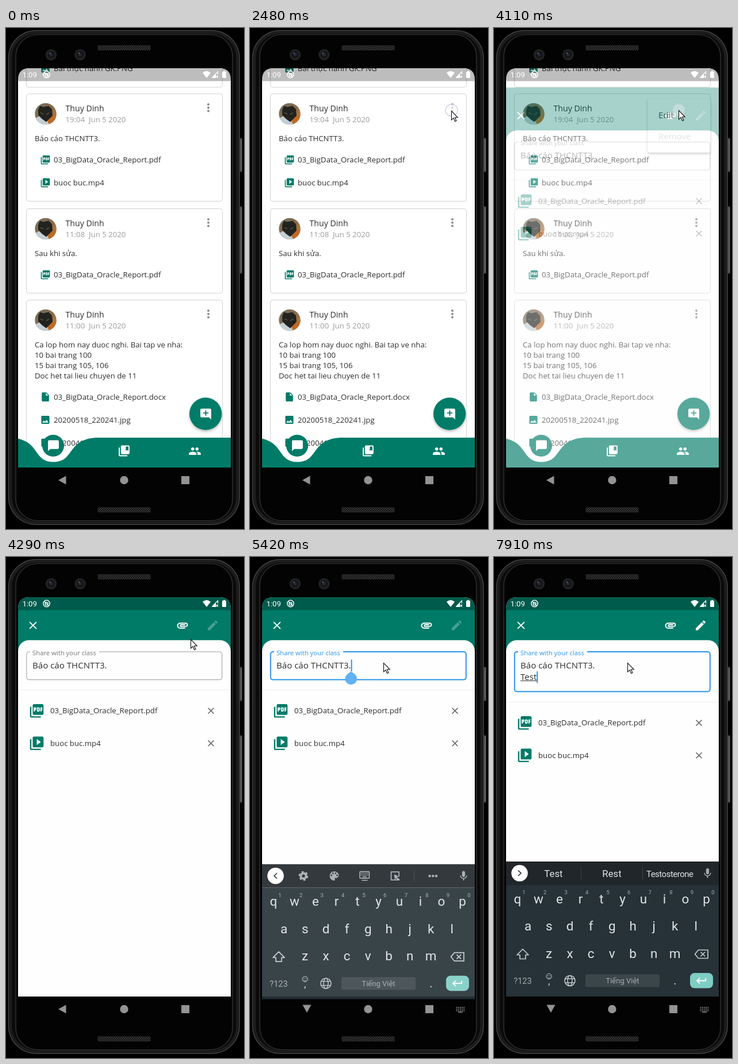
An HTML page that plays this animation: 414x872 px, repeating every 8 s.

```html
<!DOCTYPE html>
<html lang="vi">
<head>
<meta charset="utf-8">
<title>Class feed</title>
<style>
html,body{margin:0;width:100%;height:100%;overflow:hidden;background:#000}
svg{display:block;width:100vw;height:100vh}
text{font-family:"Open Sans","Noto Sans",sans-serif;white-space:pre}
.kb text,.sys text{font-family:Roboto,"Noto Sans",sans-serif}
</style>
</head>
<body>
<svg id="stage" viewBox="0 0 414 872" xmlns="http://www.w3.org/2000/svg"></svg>
<script>
const GREEN = '#007b68', BLUE = '#2b95ea', KEY = '#dfe3e5', DIM = '#a3abaf', INK = '#2d2d2d', LOOP = 8000;
const SMALL = 13.19, BIG = 15.07;

const ICONS = {
  pdf: 'M20 2H8c-1.1 0-2 .9-2 2v12c0 1.1.9 2 2 2h12c1.1 0 2-.9 2-2V4c0-1.1-.9-2-2-2zm-8.5 7.5c0 .83-.67 1.5-1.5 1.5H9v2H7.5V7H10c.83 0 1.5.67 1.5 1.5v1zm5 2c0 .83-.67 1.5-1.5 1.5h-2.5V7H15c.83 0 1.5.67 1.5 1.5v3zm4-3H19v1h1.5V11H19v2h-1.5V7h3v1.5zM9 9.5h1v-1H9v1zM4 6H2v14c0 1.1.9 2 2 2h14v-2H4V6zm10 5.5h1v-3h-1v3z',
  video: 'M4 6H2v14c0 1.1.9 2 2 2h14v-2H4V6zm16-4H8c-1.1 0-2 .9-2 2v12c0 1.1.9 2 2 2h12c1.1 0 2-.9 2-2V4c0-1.1-.9-2-2-2zm-8 12.5v-9l6 4.5-6 4.5z',
  file: 'M6 2c-1.1 0-2 .9-2 2v16c0 1.1.9 2 2 2h12c1.1 0 2-.9 2-2V8l-6-6H6zm7 7V3.5L18.5 9H13z',
  image: 'M21 19V5c0-1.1-.9-2-2-2H5c-1.1 0-2 .9-2 2v14c0 1.1.9 2 2 2h14c1.1 0 2-.9 2-2zM8.5 13.5l2.5 3 3.5-4.5 4.5 6H5l3.5-4.5z',
  chat: 'M20 2H4c-1.1 0-2 .9-2 2v18l4-4h14c1.1 0 2-.9 2-2V4c0-1.1-.9-2-2-2z',
  add: 'M22 4c0-1.1-.9-2-2-2H4c-1.1 0-2 .9-2 2v12c0 1.1.9 2 2 2h14l4 4V4zm-5 7h-4v4h-2v-4H7V9h4V5h2v4h4v2z',
  book: 'M4 6H2v14c0 1.1.9 2 2 2h14v-2H4V6zm16-4H8c-1.1 0-2 .9-2 2v12c0 1.1.9 2 2 2h12c1.1 0 2-.9 2-2V4c0-1.1-.9-2-2-2zm0 10l-2.5-1.5L15 12V4h5v8z',
  people: 'M16 11c1.66 0 3-1.34 3-3s-1.34-3-3-3-3 1.34-3 3 1.34 3 3 3zm-8 0c1.66 0 3-1.34 3-3S9.66 5 8 5 5 6.34 5 8s1.34 3 3 3zm0 2c-2.33 0-7 1.17-7 3.5V19h14v-2.5c0-2.33-4.67-3.5-7-3.5zm8 0c-.29 0-.62.02-.97.05 1.16.84 1.97 1.97 1.97 3.45V19h6v-2.5c0-2.33-4.67-3.5-7-3.5z',
  close: 'M19 6.41L17.59 5 12 10.59 6.41 5 5 6.41 10.59 12 5 17.59 6.41 19 12 13.41 17.59 19 19 17.59 13.41 12z',
  clip: 'M2 12.5C2 9.46 4.46 7 7.5 7H18c2.21 0 4 1.79 4 4s-1.79 4-4 4H9.5C8.12 15 7 13.88 7 12.5S8.12 10 9.5 10H17v2H9.41c-.55 0-.55 1 0 1H18c1.1 0 2-.9 2-2s-.9-2-2-2H7.5C5.57 9 4 10.57 4 12.5S5.57 16 7.5 16H17v2H7.5C4.46 18 2 15.54 2 12.5z',
  edit: 'M3 17.25V21h3.75L17.81 9.94l-3.75-3.75L3 17.25zM20.71 7.04c.39-.39.39-1.02 0-1.41l-2.34-2.34c-.39-.39-1.02-.39-1.41 0l-1.83 1.83 3.75 3.75 1.83-1.83z',
  palette: 'M12 3c-4.97 0-9 4.03-9 9s4.03 9 9 9c.83 0 1.5-.67 1.5-1.5 0-.39-.15-.74-.39-1.01-.23-.26-.38-.61-.38-.99 0-.83.67-1.5 1.5-1.5H16c2.76 0 5-2.24 5-5 0-4.42-4.03-8-9-8z',
  mic: 'M12 14c1.66 0 3-1.34 3-3V5c0-1.66-1.34-3-3-3S9 3.34 9 5v6c0 1.66 1.34 3 3 3zm5.3-3c0 3-2.54 5.1-5.3 5.1S6.7 14 6.7 11H5c0 3.41 2.72 6.23 6 6.72V21h2v-3.28c3.28-.48 6-3.3 6-6.72h-1.7z',
  enter: 'M19 7v4H5.83l3.58-3.59L8 6l-6 6 6 6 1.41-1.41L5.83 13H21V7z'
};

// Markup helpers
const icon = (name, cx, cy, size, fill, extra = '') =>
  `<path d="${ICONS[name]}" fill="${fill}" transform="translate(${cx - size / 2} ${cy - size / 2}) scale(${size / 24})" ${extra}/>`;
const text = (x, y, s, size, fill = INK, extra = '') =>
  `<text x="${x}" y="${y}" font-size="${size}" fill="${fill}" ${extra}>${s}</text>`;
const mid = (x, y, s, size, fill, extra = '') => text(x, y, s, size, fill, `text-anchor="middle" ${extra}`);
const rect = (x, y, w, h, fill, extra = '') =>
  `<rect x="${x}" y="${y}" width="${w}" height="${h}" fill="${fill}" ${extra}/>`;
const dot = (x, y, r, fill, extra = '') => `<circle cx="${x}" cy="${y}" r="${r}" fill="${fill}" ${extra}/>`;
const line = (d, color, w = 1, extra = '') =>
  `<path d="${d}" fill="none" stroke="${color}" stroke-width="${w}" ${extra}/>`;
const group = (id, body, extra = '') => `<g id="${id}" ${extra}>${body}</g>`;

const avatar = y => `<g transform="translate(50 ${y - 19})" clip-path="url(#round)">
  <rect width="38" height="38" fill="url(#photo)"/>
  <path d="M0 27L10 22 22 31 25 38H0Z" fill="#c3cfd3"/>
  <path d="M23 26L38 19V38H25Z" fill="#c06a25"/>
  <path d="M6 12L9 5 15 7 24 5 30 11 31 22 25 28 20 33 13 28 6 21Z" fill="#22231f"/>
  <path d="M10 17l5 2M20 20l5-3" stroke="#62655a" stroke-width="1.2"/></g>`;

const fileRow = (y, [kind, name]) =>
  icon(kind, 68.5, y, 18.84, GREEN) + text(83, y + 4.7, name, SMALL);

function card(y, h, time, lines, files) {
  const first = y + 115 + (lines.length - 1) * 17.9;
  return rect(35.5, y, 341, h, '#fff', 'rx="4" stroke="#d2d2d2"') + avatar(y + 35)
    + text(103.5, y + 30.7, 'Thuy Dinh', 14.13)
    + text(103.5, y + 49.8, `${time}\u00a0 Jun 5 2020`, SMALL, '#9b9b9b')
    + [0, 1, 2].map(i => dot(352, y + 18.5 + i * 5.7, 2, '#8b8b8b')).join('')
    + lines.map((s, i) => text(50, y + 82.6 + i * 17.9, s, SMALL)).join('')
    + files.map((f, i) => fileRow(first + i * 39.8, f)).join('');
}

const REPORT = '03_BigData_Oracle_Report';

const feed = rect(21, 70, 370, 695, '#fefefe')
  + rect(35.5, 40, 341, 63, '#fff', 'rx="4" stroke="#d2d2d2"')
  + fileRow(70.5, ['image', 'Bài thực hành GK.PNG'])
  + card(114.5, 187, '19:04', ['Báo cáo THCNTT3.'], [['pdf', REPORT + '.pdf'], ['video', 'buoc buc.mp4']])
  + card(314.5, 147, '11:08', ['Sau khi sửa.'], [['pdf', REPORT + '.pdf']])
  + card(473.5, 330, '11:00',
      ['Ca lop hom nay duoc nghi. Bai tap ve nha:', '10 bai trang 100', '15 bai trang 105, 106', 'Doc het tai lieu chuyen de 11'],
      [['file', REPORT + '.docx'], ['image', '20200518_220241.jpg'], ['image', '20200418_214530.jpg']])
  + `<path d="M8.7 713C60.5 716.5 45.7 755.3 82.7 755.3S104.9 716.5 156.7 713H391V765H8.7Z" fill="${GREEN}"/>`
  + dot(82, 727, 19, GREEN) + icon('chat', 82.5, 727, 22.6, '#fff')
  + icon('book', 205.5, 736, 22.6, '#fff') + icon('people', 328.5, 736.5, 22.6, '#fff')
  + dot(347.2, 671.5, 28.2, GREEN, 'filter="url(#lift)"') + icon('add', 347.5, 672, 22.6, '#fff');

const menu = rect(0, 123.5, 109, 93, '#fff', 'id="menuBox" rx="3" filter="url(#lift)"')
  + text(286, 157, 'Edit', BIG, '#222', 'id="item0"') + text(286, 194, 'Remove', BIG, '#222', 'id="item1"');

const attached = (y, kind, name) => icon(kind, 53.5, y, 28.3, GREEN)
  + text(77, y + 4.7, name, SMALL) + icon('close', 356.5, y, 18.84, '#666');

const editor = rect(21, 70, 370, 695, GREEN)
  + rect(21, 144.8, 370, 640, '#fefefe', 'rx="18.8"')
  + icon('close', 47, 119, 22.6, '#fff') + icon('clip', 307, 119, 22.6, '#fff')
  + icon('edit', 359.5, 119, 22.6, '#fff', 'id="pencil"')
  + rect(35.8, 165, 340, 49, 'none', 'id="field" rx="4"') + rect(42, 160, 120, 10, '#fefefe')
  + text(46, 170.8, 'Share with your class', 11.3, BLUE, 'id="label"')
  + text(46, 193.8, 'Báo cáo THCNTT3.', BIG, INK, 'id="first"')
  + text(46, 214.2, '', BIG, INK, 'id="typed"') + rect(46, 215, 0, 1, '#333', 'id="under"')
  + rect(0, 178.5, 2, 20.5, BLUE, 'id="caret"')
  + `<path id="handle" d="M175.8 199L183.2 204.8A10.3 10.3 0 1 1 168.4 204.8Z" fill="#62b1f4"/>`
  + group('files', line('M21 231.5H391', '#ececec') + attached(267.7, 'pdf', REPORT + '.pdf') + attached(324.3, 'video', 'buoc buc.mp4'));

// Keyboard
const ROWS = [['qwertyuiop', 41, 602.5], ['asdfghjkl', 59.2, 650], ['zxcvbnm', 95.6, 697.5]];
const letters = ROWS.map(([keys, x, y]) =>
  [...keys].map((k, i) => mid(x + i * 36.5, y, k, 22.5, KEY, 'class="key"')).join('')).join('');
const digits = [...'1234567890'].map((d, i) => mid(52 + i * 36.55, 587, d, 9.5, DIM)).join('');

const keyGrid = (cx, cy, color) => [0, 1].map(r => [0, 1, 2, 3, 4].map(c =>
  rect(cx - 6.5 + c * 2.8, cy - 3.3 + r * 3, 1.7, 1.7, color)).join('')).join('')
  + rect(cx - 3.5, cy + 2.8, 7, 1.6, color);

const gear = dot(93, 550.5, 4.6, 'none', `stroke="${DIM}" stroke-width="4"`)
  + dot(93, 550.5, 7.2, 'none', `stroke="${DIM}" stroke-width="2.6" stroke-dasharray="3.77"`);

const tools = gear + icon('palette', 146.5, 550.5, 21, DIM)
  + [[-5, -1], [-2.3, -4.6], [2.3, -4.6], [5, -1]].map(([x, y]) => dot(146.5 + x, 550.5 + y, 1.4, '#20262a')).join('')
  + rect(191, 543, 16.5, 11.5, 'none', `rx="1" stroke="${DIM}" stroke-width="1.6"`) + keyGrid(199.3, 548.3, DIM)
  + line('M194.5 558H204.5', DIM, 1.6)
  + line('M259 552V543.5H245.5V557.5H259V555', DIM, 1.8) + `<path d="M250.5 547.5L258.5 551 255.8 552.6 259.5 556.5 257.5 558.5 253.8 554.6 252 557Z" fill="${DIM}"/>`
  + line('M285.5 541V560', '#3b4347') + [312.5, 318.3, 324].map(x => dot(x, 550.5, 2.2, DIM)).join('');

const hints = line('M151.5 539V562M258.5 539V562', '#3b4347')
  + [103.5, 205, 305.7].map((x, i) => mid(x, 557, '', 16.8, KEY, `id="hint${i}"`)).join('');

const keyboard = rect(21, 530, 370, 41, '#20262a') + rect(21, 571, 370, 194, '#263238')
  + dot(44.5, 550.3, 14.3, '#fff') + line('M47 545.5L42 550.3 47 555', '#333', 1.7, 'id="chevron"')
  + group('tools', tools) + group('hints', hints) + icon('mic', 371.5, 550.5, 21, DIM)
  + letters + digits
  + line('M50 682.5L40 692.5H45V699.5H55V692.5H60Z', '#c4cacd', 1.7, 'id="shift" stroke-linejoin="round"')
  + line('M355.5 684H372V698.5H355.5L349.5 691.2ZM359.5 687.5L367 695M367 687.5L359.5 695', '#c4cacd', 1.7)
  + mid(50, 743, '?123', 14.5, DIM)
  + dot(95.7, 730, 4.7, 'none', 'stroke="#c4cacd"') + line('M93 731.5Q95.7 735 98.4 731.5', '#c4cacd')
  + dot(94, 728.7, .8, '#c4cacd') + dot(97.4, 728.7, .8, '#c4cacd') + mid(95.7, 744, ',', 18, '#c4cacd')
  + dot(132, 737.5, 9, 'none', 'stroke="#c4cacd" stroke-width="1.5"')
  + '<ellipse cx="132" cy="737.5" rx="4" ry="9" fill="none" stroke="#c4cacd" stroke-width="1.4"/>'
  + line('M124 734H140M124 741H140', '#c4cacd', 1.4)
  + rect(159, 726.5, 129, 22, '#3b464b', 'rx="2.5"') + mid(223.5, 742.3, 'Tiếng Việt', 13, DIM)
  + mid(315, 744, '.', 20, KEY)
  + rect(341, 724, 40, 26.5, '#7fcdc4', 'rx="8"') + icon('enter', 361, 737.5, 22, '#fff');

// Phone shell
const speaker = y => rect(159.5, y, 92, 9, '#161616', 'rx="2"') + rect(159.5, y, 92, 9, 'url(#mesh)', 'rx="2"');
const lens = x => dot(x, 46.5, 9.8, '#202123') + dot(x, 46.5, 6, '#121315') + dot(x, 46.5, 3, '#242733') + dot(x - 2, 44, 1.4, '#55585f');
const button = (y, h) => rect(406, y, 5, h, '#303030', 'rx="2"') + line(`M408.8 ${y + 2}V${y + h - 2}`, '#7a7a7a', 1.6);
const shell = rect(0, 0, 414, 872, '#000') + button(191, 60) + button(310, 118)
  + rect(4.5, 4.5, 401.5, 859.5, '#0b0b0b', 'rx="48" stroke="#484848" stroke-width="1.5"')
  + rect(8, 8, 394.5, 852.5, 'none', 'rx="44" stroke="#1d1d1d" stroke-width="4"')
  + rect(17, 11.5, 377, 846, '#030303', 'rx="38" stroke="#383838" stroke-width="1.2"')
  + speaker(30) + speaker(834.3) + lens(78.5) + lens(129);

const status = rect(21, 70, 370, 22.5, '#000', 'fill-opacity=".26"')
  + text(28.5, 86, '1:09', 13.2, '#fff')
  + dot(70.5, 81, 5.7, 'none', 'stroke="#fff" stroke-width="1.5"') + dot(70.5, 81.5, 2.6, 'none', 'stroke="#fff" stroke-width="1.3"')
  + line('M66.5 77L74.5 85', '#fff', 1.3)
  + '<path d="M342 78Q349 72 356 78L349 87Z" fill="#fff"/>'
  + line('M358.5 86.5L368.5 76V81M358.5 86.5H363', '#fff', 1.2)
  + '<path d="M358 87L365 79.5V87Z" fill="#fff"/>' + line('M365.5 83L369 86.5M369 83L365.5 86.5', '#fff', 1.1)
  + rect(376, 76, 7, 11, '#fff', 'rx="1"') + rect(378, 74.8, 3, 2, '#fff');

const nav = '<path id="back" d="M91 787L104.5 779.5V794.5Z" fill="#939393"/>'
  + '<path id="down" d="M91.5 779.5H106.5L99 793Z" fill="#939393"/>'
  + dot(205.5, 787, 7.2, '#939393') + rect(305, 780, 14, 14, '#939393')
  + group('kbIcon', [0, 1, 2].map(r => [0, 1, 2, 3, 4].map(c =>
      rect(358.5 + c * 3.2, 783 + r * 3, 1.9, 1.7, '#8a8a8a')).join('')).join('') + rect(362, 791.5, 8, 1.5, '#8a8a8a'));

const defs = `<defs>
  <clipPath id="screen"><path d="M21 765V90Q21 70 41 70H371Q391 70 391 90V765Z"/></clipPath>
  <clipPath id="round"><circle cx="19" cy="19" r="18.7"/></clipPath>
  <linearGradient id="photo" x2="1" y2="1"><stop stop-color="#6b6f66"/><stop offset=".5" stop-color="#8a6a48"/><stop offset="1" stop-color="#d98534"/></linearGradient>
  <pattern id="mesh" width="4" height="4" patternUnits="userSpaceOnUse"><path d="M0 4L4 0M0 0L4 4" stroke="#3a3a3a" stroke-width=".8"/></pattern>
  <filter id="lift" x="-30%" y="-30%" width="160%" height="170%"><feDropShadow dx="0" dy="2.5" stdDeviation="2" flood-opacity=".28"/></filter>
</defs>`;

const stage = document.getElementById('stage');
stage.innerHTML = defs + shell
  + `<g clip-path="url(#screen)">${feed}${group('menu', menu)}${group('editor', editor)}${group('status', status, 'class="sys"')}</g>`
  + group('keyboard', keyboard, 'class="kb"') + nav
  + dot(0, 0, 10.5, '#fff', 'id="ring" fill-opacity=".65" stroke="#cfcfe4" stroke-width="1.3"')
  + '<path id="pointer" d="M.5.5V16L4 12.7 6.7 18.5 9 17.5 6.4 11.8H11.3Z" fill="#fff" stroke="#111" stroke-width="1.1"/>';

const el = {};
stage.querySelectorAll('[id]').forEach(n => el[n.id] = n);
const keys = [...stage.querySelectorAll('.key')];
const set = (id, attrs) => { for (const k in attrs) el[id].setAttribute(k, attrs[k]); };
const show = (id, on) => { el[id].style.display = on ? '' : 'none'; };

// Timing
const clamp = v => Math.max(0, Math.min(1, v));
function bezier(x1, y1, x2, y2) {
  const at = (a, b, u) => 3 * a * u * (1 - u) ** 2 + 3 * b * u * u * (1 - u) + u ** 3;
  return x => {
    let lo = 0, hi = 1;
    for (let i = 0; i < 24; i++) {
      const u = (lo + hi) / 2;
      if (at(x1, x2, u) < x) lo = u; else hi = u;
    }
    return at(y1, y2, lo);
  };
}
const easeIn = bezier(.42, 0, 1, 1), slowIn = bezier(.4, 0, .2, 1);

const BURSTS = [[900, 1080, 3], [1760, 2240, 6], [2480, 2480, 1], [2550, 2810, 4], [3060, 3230, 3], [3420, 3420, 1],
  [3570, 3570, 1], [3840, 3840, 1], [4020, 4290, 4], [4560, 4700, 3], [4920, 5240, 5], [5330, 5600, 4],
  [6350, 6350, 1], [6810, 6810, 1], [7160, 7400, 4], [7580, 7660, 2], [7830, 7910, 2]];
const ticks = [0];
for (const [a, b, n] of BURSTS)
  for (let i = 0; i < n; i++) ticks.push(n > 1 ? Math.round(a + (b - a) * i / (n - 1)) : a);
const snap = t => ticks.reduce((last, s) => s <= t ? s : last, 0);

const PATH = [[900, 359, 228], [1080, 317, 206], [1670, 317, 206], [2240, 350, 144], [2970, 350, 144], [3230, 324, 143],
  [3420, 322, 143], [3570, 321, 143], [4470, 321, 143], [4700, 232, 184]];
function pointerAt(t) {
  const i = PATH.findIndex(p => p[0] > t);
  if (i < 0) return PATH[PATH.length - 1].slice(1);
  if (i === 0) return PATH[0].slice(1);
  const [a, b] = [PATH[i - 1], PATH[i]], u = (t - a[0]) / (b[0] - a[0]);
  return [a[1] + (b[1] - a[1]) * u, a[2] + (b[2] - a[2]) * u];
}

const latest = (list, t) => list.reduce((v, [at, x]) => at <= t ? x : v, list[0][1]);
const TYPED = [[0, ''], [7240, 'T'], [7580, 'Te'], [7660, 'Test']];
const MARKED = [[0, 0], [7320, 1], [7580, 2], [7660, 3], [7830, 4]];
const WORDS = [[0, ['T', 'The', 'This']], [7580, ['Te', 'The', 'Text']], [7660, ['Tes', 'Test', 'Text']],
  [7830, ['Test', 'Tests', 'Testosterone']], [7910, ['Test', 'Rest', 'Testosterone']]];

function drawMenu(t) {
  const p = t < 3900 ? clamp((t - 2500) / 300) : clamp(1 - (t - 4005) / 300);
  show('menu', p > 0);
  const unit = 1 / 3.5, w = 109 * clamp(p / unit), h = 93 * clamp(p / (2 * unit));
  set('menu', { opacity: clamp(p * 3) });
  set('menuBox', { x: 376.5 - w, width: w, height: h });
  [0, 1].forEach(i => set('item' + i, { opacity: clamp((p - (i + 1) * unit) / (1.5 * unit)) }));
}

function drawEditor(t) {
  const p = clamp((t - 3952) / 300), focus = t >= 5000, wrapped = t >= 5600;
  show('editor', t >= 4020);
  set('editor', { opacity: easeIn(p), transform: `translate(0 ${174 * (1 - slowIn(p))})` });
  set('pencil', { opacity: wrapped ? 1 : .28 });
  set('field', { height: wrapped ? 69.2 : 48.6, stroke: focus ? BLUE : '#999', 'stroke-width': focus ? 2 : 1 });
  set('label', { fill: focus ? BLUE : '#777' });
  set('files', { transform: `translate(0 ${wrapped ? 21 : 0})` });
  show('handle', t >= 5160 && !wrapped);
  show('caret', t >= 5160 && !(t >= 6350 && t < 6810));

  const word = latest(TYPED, t);
  el.typed.textContent = word;
  const end = wrapped ? (word ? el.typed.getComputedTextLength() : 0) : el.first.getComputedTextLength();
  set('caret', { x: 46 + end, y: wrapped ? 198.8 : 178.5 });
  const n = latest(MARKED, t);
  set('under', { width: n ? el.typed.getSubStringLength(0, n) : 0 });
}

function drawKeyboard(t) {
  const e = 1 - (1 - clamp((t - 5240) / 257)) ** 2;
  const caps = t >= 7160 && t < 7320, hinting = t >= 7320;
  show('keyboard', e > 0);
  set('keyboard', { opacity: e, transform: `translate(0 ${52 * (1 - e)})` });
  keys.forEach(k => {
    const c = k.textContent;
    k.textContent = caps ? c.toUpperCase() : c.toLowerCase();
  });
  set('shift', { fill: caps ? '#c4cacd' : 'none' });
  show('tools', !hinting);
  show('hints', hinting);
  set('chevron', { transform: hinting ? 'translate(89 0) scale(-1 1)' : '' });
  latest(WORDS, t).forEach((w, i) => {
    el['hint' + i].textContent = w;
    set('hint' + i, w.length > 8 ? { 'font-size': 15, 'letter-spacing': -.5 } : { 'font-size': 16.8, 'letter-spacing': 0 });
  });
  const open = t >= 5160;
  show('back', !open);
  show('down', open);
  show('kbIcon', open);
}

function drawPointer(t) {
  const [x, y] = pointerAt(t);
  show('pointer', t >= 900);
  set('pointer', { transform: `translate(${x} ${y})` });
  show('ring', (t >= 2480 && t < 2640) || (t >= 3840 && t < 4200) || (t >= 4920 && t < 5080));
  set('ring', { cx: x + .7, cy: y - .7, opacity: t >= 4020 && t < 4200 ? .45 : 1 });
}

function draw(t) {
  drawMenu(t);
  drawEditor(t);
  drawKeyboard(t);
  drawPointer(t);
}

const start = performance.now();
function loop() {
  draw(snap((performance.now() - start) % LOOP));
  requestAnimationFrame(loop);
}
draw(0);
requestAnimationFrame(loop);
</script>
</body>
</html>
```
